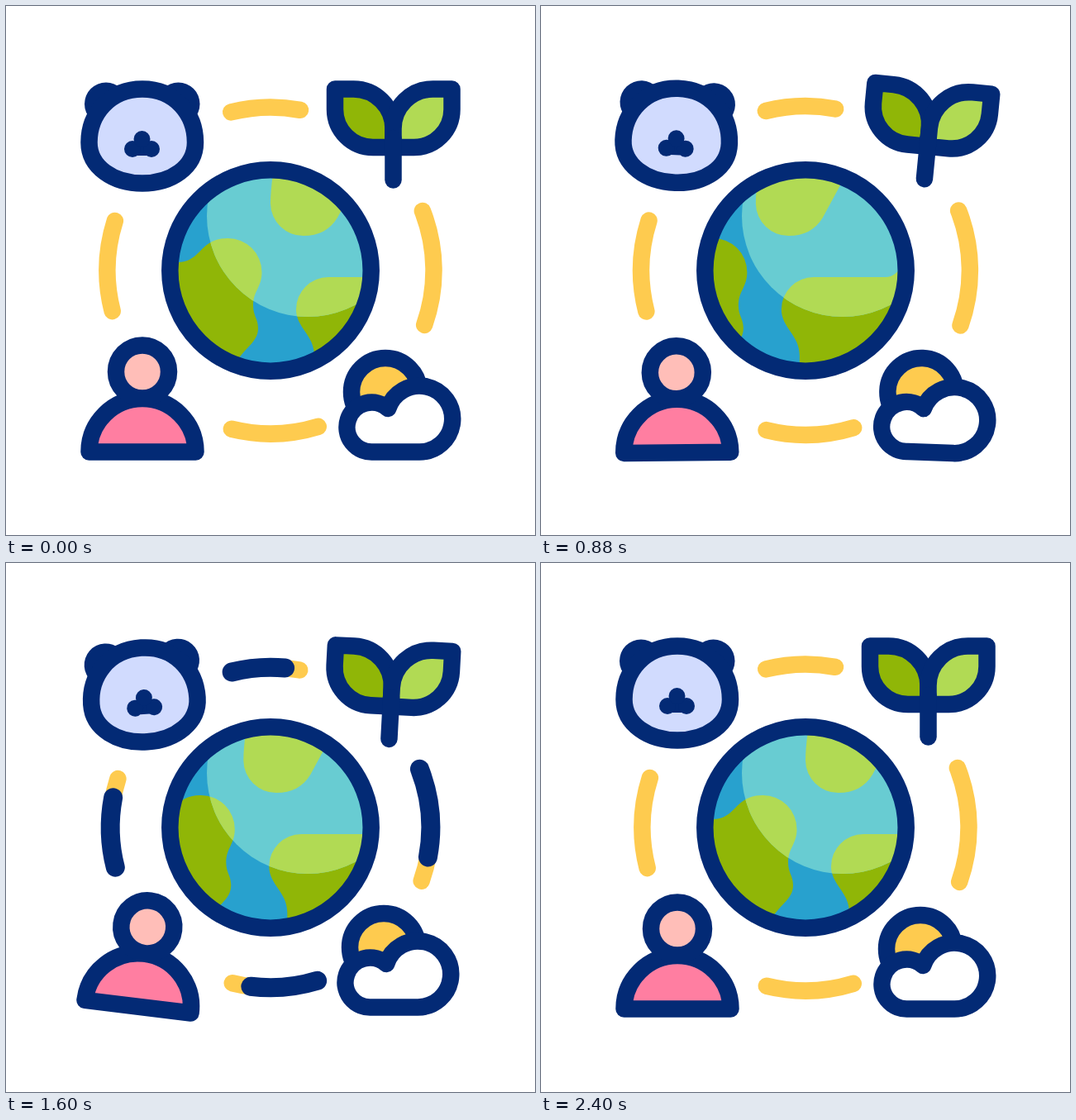
Write an HTML page that moves like this. It is 640 px wide and 640 px high and loops after 3 s.

```html
<!DOCTYPE html>
<html lang="en">
<head>
<meta charset="utf-8">
<title>Living planet</title>
<style>
  html, body { margin: 0; height: 100%; overflow: hidden; background: #fff; }
  svg { display: block; width: 100%; height: 100%; }
  .line { stroke: #032a75; stroke-width: 20.5; stroke-linecap: round; stroke-linejoin: round; }
  .navy { fill: #032a75; }
  #base, #pulse { fill: none; stroke: #fecb4f; stroke-linecap: round; }
  #pulse { stroke: #032a75; }
</style>
</head>
<body>
<svg viewBox="0 0 640 640">
  <defs>
    <clipPath id="disc"><circle cx="320" cy="320" r="116"/></clipPath>
    <clipPath id="shine"><circle cx="365" cy="254" r="122"/></clipPath>
    <g id="tile">
      <path d="M325 190Q320 220 320 239A39.5 39.5 0 0 0 360 278C378 278 392 271 401 256L440 184Z"/>
      <path d="M373 445V425C374 398 351 390 351 367A39 39 0 0 1 390 328H477C493 328 494 310 511 310H538C566 310 564 281 598 281A41 41 0 0 1 639.5 322C639.5 340 629 345 629 362C629 375 635 378 635 390C635 410 612 415 602 445Z"/>
    </g>
    <g id="land">
      <use href="#tile"/><use href="#tile" x="-330"/><use href="#tile" x="-660"/>
    </g>
  </defs>

  <g id="base"></g>
  <g id="pulse"></g>

  <g clip-path="url(#disc)">
    <path fill="#28a1ce" d="M200 200h240v240h-240z"/>
    <use class="land" href="#land" fill="#90b607"/>
    <g clip-path="url(#shine)">
      <path fill="#68ccd2" d="M200 200h240v240h-240z"/>
      <use class="land" href="#land" fill="#b1da54"/>
    </g>
  </g>
  <circle class="line" cx="320" cy="320" r="121.7" fill="none"/>

  <g id="bear">
    <circle class="navy" cx="121" cy="118.5" r="26"/>
    <circle class="navy" cx="208.5" cy="118.5" r="26"/>
    <path class="line" fill="#d1dbfe" d="M165 100.5C125 100.5 100.5 131 100.5 165C100.5 195 130 214.5 165 214.5C200 214.5 229 195 229 165C229 131 205 100.5 165 100.5Z"/>
    <path class="navy" d="M153 173L164.5 161 176 173 170 181H159Z"/>
    <circle class="navy" cx="153" cy="173" r="10"/>
    <circle class="navy" cx="176" cy="173" r="10"/>
    <circle class="navy" cx="164.5" cy="161" r="10"/>
  </g>

  <g id="plant" class="line">
    <path fill="#90b607" d="M398 100.5H420.5A48 48 0 0 1 468.5 148.5V171H444A46 46 0 0 1 398 125Z"/>
    <path fill="#b1da54" d="M539.5 100.5H516.5A48 48 0 0 0 468.5 148.5V171H493.5A46 46 0 0 0 539.5 125Z"/>
    <path d="M468.5 160V210.5"/>
  </g>

  <g id="person" class="line">
    <path fill="#ff7ea1" d="M100.5 539.5A64.5 64.5 0 0 1 229.5 539.5Z"/>
    <circle fill="#ffbeb8" cx="165" cy="442.5" r="32"/>
  </g>

  <g id="cloud" class="line">
    <circle fill="#fecb4f" cx="459" cy="467" r="41"/>
    <path fill="#fff" d="M462.2 487A40 40 0 1 1 500 539.5H445A30 30 0 1 1 462.2 487Z"/>
  </g>
</svg>
<script>
const $ = id => document.getElementById(id);
const clamp = u => Math.min(1, Math.max(0, u));
const ease = u => (u = clamp(u)) * u * (3 - 2 * u);
const begin = 200, end = 2400;

// Eased swing from pose to pose, one every `step` ms, resting before and after.
const swing = (step, ...poses) => t => poses.reduce((sum, pose, i) =>
  i ? sum + (pose - poses[i - 1]) * ease((t - begin) / step - i + 1) : pose, 0);

const spread = swing(500, 1, .97, 1.095, .968, 1);

// Three turns of the globe: a long drift that slows down plus a quick spin.
const scroll = t => 165 * (1 - (1 - clamp((t - begin) / (end - begin))) ** 1.6)
  + 825 * ease((t - 608) / 858);

// Icon, its reach away from the centre, pivot and tilt.
const icons = [
  ['bear', -113, -104, 165, 157, swing(320, 0, -7, 2, 0, -5.5, 0)],
  ['plant', 112, -138, 469, 155, swing(500, 0, 10, -5, 4, 0)],
  ['person', -125, 125, 165, 475, swing(320, 0, 9, -.5, -2, 9.5, 1.5, 0)],
  ['cloud', 105, 110, 478, 483, swing(340, 0, -7.5, 2.3, -6.5, 0)]
];

// Ring pieces as clockwise angles in degrees.
const polar = deg => [Math.cos, Math.sin].map(f => 197.5 * f(deg * Math.PI / 180)).join(' ');
const arcs = [[-104, -79.5], [-21.4, 19.5], [73, 103.8], [165.6, 197.7]];
$('base').innerHTML = $('pulse').innerHTML = arcs.map(([a, b]) =>
  `<path pathLength="1" d="M${polar(a)}A197.5 197.5 0 0 1 ${polar(b)}"/>`).join('');

function draw(t) {
  const size = spread(t), push = size - 1;
  for (const [id, dx, dy, x, y, tilt] of icons)
    $(id).setAttribute('transform', `translate(${dx * push} ${dy * push}) rotate(${tilt(t)} ${x} ${y})`);

  for (const [id, width] of [['base', 20.5], ['pulse', 23]]) {
    $(id).setAttribute('transform', `translate(320 320) scale(${size})`);
    $(id).setAttribute('stroke-width', width / size);
  }

  // Two dark sweeps; the tail follows the head.
  const age = t - begin - (t < 1200 ? 0 : 1120);
  const head = ease(age / 400), tail = ease((age - 280) / 400);
  $('pulse').style.display = head > tail ? '' : 'none';
  $('pulse').setAttribute('stroke-dasharray', `${head - tail} 3`);
  $('pulse').setAttribute('stroke-dashoffset', -tail);

  for (const land of document.querySelectorAll('.land')) land.setAttribute('x', scroll(t) % 330);
}

const start = performance.now();
function tick() {
  const t = (performance.now() - start) % 3000;
  draw(Math.floor(t / 40) * 40);
  requestAnimationFrame(tick);
}
tick();
</script>
</body>
</html>
```
